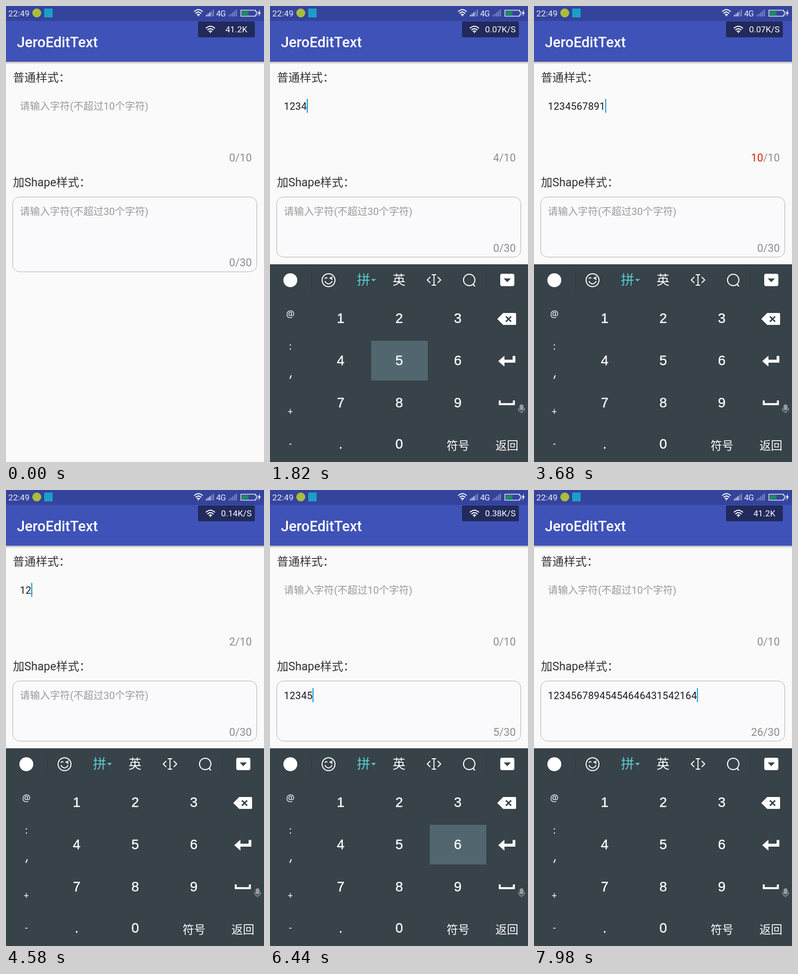
Animation of 520x918 px, one loop 8000 ms. Source, as an HTML page:

```html
<!DOCTYPE html>
<html lang="zh-CN">
<head>
<meta charset="utf-8">
<title>JeroEditText</title>
<style>
  html, body { margin: 0; width: 100%; height: 100%; overflow: hidden; background: #fafafa; }
  svg { display: block; width: 520px; height: 918px; }
  text { font-family: Roboto, 'Noto Sans CJK SC', 'Noto Sans CJK JP', sans-serif; white-space: pre; }
  .key { font-family: 'Liberation Sans', 'Noto Sans CJK SC', sans-serif; }
  .num { font-family: 'Liberation Sans', sans-serif; stroke: #fff; stroke-width: .4; }
  .sym { font-family: 'Noto Sans', 'Noto Sans CJK SC', sans-serif; }
  .label { font-size: 23.1px; fill: #333; }
  .hint { font-size: 20.2px; fill: #999; }
  .hint, .typed { letter-spacing: 0; }
  .typed { font-size: 20.2px; fill: #1c1c1c; letter-spacing: .21px; }
  .count { font-size: 21.67px; fill: #8c8c8c; letter-spacing: .1px; text-anchor: end; }
  .line { fill: none; stroke: #fff; stroke-width: 2; }
  .caret { fill: #0e93d8; }
</style>
</head>
<body>
<svg viewBox="0 0 520 918">
  <defs>
    <linearGradient id="shade" x1="0" y1="0" x2="0" y2="1">
      <stop offset="0" stop-color="#000" stop-opacity=".3"/>
      <stop offset="1" stop-color="#000" stop-opacity="0"/>
    </linearGradient>
    <g id="wifi" fill="none" stroke="#fff" stroke-width="2">
      <path d="M.8 5Q10-3.4 19.2 5M3.8 8.4Q10 2.8 16.2 8.4M6.8 11.4Q10 8.8 13.2 11.4"/>
      <circle cx="10" cy="13" r="1.3" fill="#fff" stroke="none"/>
    </g>
    <g id="mic">
      <rect x="-4" y="-9" width="8" height="12" rx="4"/>
      <path d="M-6-2V0A6 6 0 0 0 6 0V-2M0 6V9" fill="none" stroke="#949b9f" stroke-width="1.5"/>
    </g>
  </defs>

  <rect width="520" height="918" fill="#fafafa"/>
  <rect y="112" width="520" height="5" fill="url(#shade)"/>
  <rect width="520" height="112" fill="#3f52b7"/>
  <rect width="520" height="30" fill="#34439c"/>
  <text x="22" y="83" font-size="28.9" font-weight="500" fill="#fff">JeroEditText</text>

  <g id="status" fill="#e9ebf6">
    <text x="4.500" y="21" font-size="17.200">22:49</text>
    <circle cx="62" cy="14" r="9" fill="#a9bf3c"/>
    <rect x="77" y="5" width="17" height="18" rx="1.500" fill="#1b9fc4"/>
    <use href="#wifi" transform="translate(378.500 6.500) scale(.93 1)"/>
    <text x="423.500" y="20.500" font-size="16.500" letter-spacing="-.8">4G</text>
    <path d="M473.500 8.500H503V11.500H505.500V17.500H503V20.500H473.500Z" fill="none" stroke="#e9ebf6" stroke-width="1.500"/>
    <rect x="475.500" y="10.500" width="13" height="8" fill="#15925a"/>
    <path d="M512 7L507 15H510L508.500 21.500L514 13H511Z"/>
  </g>

  <g fill="#fff">
    <rect x="387" y="31" width="114.500" height="32" rx="3" fill="#212a5b"/>
    <use href="#wifi" transform="translate(402 40)"/>
    <text id="speed" x="464.300" y="53" font-size="17.200" text-anchor="middle"></text>
  </g>

  <text class="label" x="14" y="151.500">普通样式：</text>
  <text class="label" x="14" y="363">加Shape样式：</text>
  <rect id="frame" x="13.500" y="384.500" width="492" rx="14" fill="#fafafc" stroke="#b0b0b0"/>
  <g id="fields"></g>

  <g id="board">
    <rect y="520" width="520" height="398" fill="#374249"/>
    <rect id="press" fill="#51666f"/>
    <g id="tools">
      <path d="M83.500 532V572M436.500 532V572" stroke="#303a40"/>
      <circle cx="41" cy="552" r="14" fill="#fff"/>
      <g class="line">
        <circle cx="118" cy="552" r="13"/>
        <path d="M110.500 554Q118 565 125.500 554M110.500 549Q113 545.500 115.500 548M126 545.500L121 548L126 550.500"/>
        <path d="M323 545.500L317 551.500L323 557.500M338 545.500L344 551.500L338 557.500M326 541H335M326 562H335M330.500 541V562"/>
        <circle cx="401.500" cy="551.500" r="11.500"/>
        <path d="M408.500 559.500L413 564.500" stroke-width="2.500"/>
      </g>
      <path d="M204 549.500H213.500L208.700 554.500Z" fill="#5cc8cf"/>
      <rect x="464" y="539" width="28.500" height="25" rx="4" fill="#fff"/>
      <path d="M471 548.500H485.500L478.200 556Z" fill="#374249"/>
    </g>
    <g id="cands">
      <path class="line" d="M469 546.500L478 556L487 546.500" stroke-width="3"/>
      <rect y="486" width="29" height="34" fill="#6f7e86"/>
      <path d="M23.500 493L32 484.500" stroke="#808b90" stroke-width="5"/>
      <path d="M25 491.500L31 485.500" stroke="#e8ecee" stroke-width="2"/>
    </g>
    <g id="alpha">
      <rect x="204" y="871" width="113.500" height="34" rx="4" fill="#5e696f"/>
      <use href="#mic" x="305" y="889" fill="#949b9f"/>
    </g>
    <g id="idle">
      <path d="M79.500 589V752" stroke="#5d686e" stroke-width="2.500"/>
      <circle cx="41" cy="692" r="2" fill="none" stroke="#fff" stroke-width="1.300"/>
      <g class="line">
        <circle cx="477.500" cy="800" r="14.500" stroke-width="2.500"/>
        <path d="M469.500 803Q477.500 813 485.500 803"/>
      </g>
      <circle cx="472" cy="796" r="2" fill="#fff"/>
      <circle cx="483" cy="796" r="2" fill="#fff"/>
    </g>
    <g id="comp"></g>
    <g id="digits">
      <path class="line" d="M43 743.500L40 750.500" stroke-width="1.500"/>
      <path d="M463 794V801.500H491.500V794" fill="none" stroke="#fff" stroke-width="4"/>
      <use href="#mic" x="507" y="811" fill="#949b9f"/>
    </g>
    <g id="always" fill="#fff">
      <path d="M458 630L470 618H494Q496 618 496 620V640Q496 642 494 642H470Z"/>
      <path d="M475.500 625L486 635.500M486 625L475.500 635.500" stroke="#374249" stroke-width="3"/>
      <path d="M460 715L472.500 704V712H489V704.500H494.500V718H472.500V726Z"/>
    </g>
  </g>
</svg>
<script>
const LOOP = 8000, BLINK = 250, DIGIT = 11.56;
const $ = id => document.getElementById(id);

function add(parent, tag, attrs, text) {
  const el = document.createElementNS('http://www.w3.org/2000/svg', tag);
  for (const k in attrs) el.setAttribute(k, attrs[k]);
  if (text) el.textContent = text;
  return parent.appendChild(el);
}
const label = (group, x, y, size, text, cls = 'key', fill = '#fff') =>
  add($(group), 'text', { x, y, 'font-size': size, class: cls, fill, 'text-anchor': 'middle' }, text);

// Signal strength bars
[[403, 3], [449, 0]].forEach(([x, lit]) => {
  for (let i = 0; i < 5; i++) {
    const h = 3 + i * 2.7;
    add($('status'), 'rect', { x: x + i * 3.5, y: 21 - h, width: 2, height: h, opacity: i < lit ? 1 : .45 });
  }
});

// Keyboard labels
const colX = c => 142.5 + c * 118;
label('tools', 188.5, 561, 27, '拼', 'key', '#5cc8cf');
label('tools', 260, 561, 26, '英');
[['哦', 36], ['你', 105], ['m', 169], ['n', 223.5], ['o', 273], ['那', 328], ['呢', 388]].forEach(([s, x], i) =>
  label('cands', x, 562, 28.5, s, 'key', i ? '#fff' : '#86d9df'));
label('cands', 10.5, 512, 25, 'o');

['分词', 'abc', 'def', 'ghi', 'jkl', 'mno', 'pqr s', 'tuv', 'wxy z'].forEach((s, i) => {
  const x = colX(i % 3), row = Math.floor(i / 3), [a, b] = s.split(' ');
  label('alpha', x, 610 + row * 85, 16, i + 1, 'key', '#6f797e');
  if (!i) label('alpha', x, 643, 24, s).setAttribute('font-weight', 500);
  else label('alpha', x, (b ? 806 : 643 + row * 85), 30.5, a);
  if (b) label('alpha', x, 828, 30.5, b);
  label('digits', x, 638 + row * 85, 27.5, i + 1, 'num');
});
label('alpha', 260.5, 856, 16, '0', 'key', '#6f797e');
label('alpha', 142.5, 892.5, 23, '中');
label('alpha', 476.5, 892, 22, '123', 'sym');
label('digits', 142.5, 891, 27.5, '.', 'num');
label('digits', 260.5, 891, 27.5, '0', 'num');
label('digits', 477.5, 892.5, 23, '返回');
label('always', 379, 892.5, 23, '符号');

[[',', 628], ['?', 758], ['!', 823], ['～', 889]].forEach(([s, y]) => label('idle', 41, y, 22, s, 'sym'));
[['m', 628], ['n', 693], ['o', 759], ['6', 824]].forEach(([s, y]) => label('comp', 41, y, 20, s));
label('comp', 41.5, 888.5, 20, '英文');
label('comp', 477.5, 809, 23, '清空');
[['@', 627], [':', 692], ['+', 823], ['-', 888]].forEach(([s, y]) => label('digits', 41, y, 19, s, 'sym'));

// The two input fields
const fields = [{ y: 209, max: 10 }, { y: 421, max: 30 }].map(({ y, max }) => {
  const g = $('fields');
  const hint = add(g, 'text', { class: 'hint', x: 28, y });
  hint.innerHTML = `请输入字符(不超过<tspan letter-spacing=".21">${max}</tspan>个字符)`;
  const typed = add(g, 'text', { class: 'typed', x: 28, y });
  const count = add(g, 'text', { class: 'count', x: 495.5, y: y + 103.5 });
  const used = add(count, 'tspan', {});
  add(count, 'tspan', {}, '/' + max);
  const caret = add(g, 'rect', { class: 'caret', y: y - 22, width: 2, height: 28 });
  return { max, hint, typed, count, used, caret };
});

// Key taps: < deletes, # opens digits, m starts composing, F focuses the second field
const taps = [];
const run = (keys, start, step, hold = 45) =>
  [...keys].forEach((key, i) => taps.push({ key, down: start + i * step, up: start + i * step + hold }));
run('#', 1160, 0, 80);
run('123456789', 1420, 94, 48);
run('999', 2260, 90, 50);
run('<', 2740, 0, 60);
run('111111', 2940, 100, 50);
run('1', 3620, 0, 60);
run('<<<<<', 3740, 78, 48);
run('<<<<<', 4360, 78, 48);
run('F', 4940, 0, 0);
run('m', 5200, 0, 70);
run('<', 5520, 0, 60);
run('#', 5760, 0, 80);
run('12345678945', 6040, 75, 40);
run('4546', 6880, 70, 40);
run('4', 7160, 0, 60);
run('643154', 7260, 62, 36);
run('2164', 7700, 80, 40);

const speeds = [[0, '41.2K'], [140, '0.02K/S'], [1700, '0.07K/S'], [3920, '0.14K/S'], [5260, '0.38K/S'], [7400, '41.2K']];

function stateAt(t) {
  const s = { text: ['', ''], focus: 0, digits: false, comp: false, held: '', blink: 710 };
  for (const { key, down, up } of taps) {
    if (t < down) break;
    if (t < up) { s.held = key; break; }
    const old = s.text[s.focus];
    let now = old;
    if (key === '#') s.digits = true;
    else if (key === 'F') { s.focus = 1; s.digits = false; s.blink = up; }
    else if (key === 'm') { s.comp = true; s.blink = up; }
    else if (key === '<') { if (s.comp) s.comp = false; else now = old.slice(0, -1); }
    else if (old.length < fields[s.focus].max) now += key;
    if (now !== old) { s.text[s.focus] = now; s.blink = up; }
  }
  return s;
}

function keyBox(key) {
  const n = key === 'm' ? 5 : key - 1;
  const [c, r] = key === '<' ? [3, 0] : key === '#' ? [3, 3] : [n % 3, Math.floor(n / 3)];
  return { x: 86 + c * 118, y: 589 + r * 85, width: c < 3 ? 114 : 74, height: 80 };
}

const show = (el, on) => { el.style.display = on ? '' : 'none'; };

function draw(t) {
  const s = stateAt(t);
  const shrunk = t >= 420;
  $('speed').textContent = speeds.filter(v => v[0] <= t).pop()[1];
  $('frame').setAttribute('height', shrunk ? 121 : 150.5);

  fields.forEach((f, i) => {
    const text = s.text[i], n = text.length;
    show(f.hint, !n);
    f.typed.textContent = text;
    f.used.textContent = n;
    f.used.setAttribute('fill', n === f.max ? '#e01c0c' : '#8c8c8c');
    const lit = t < s.blink || (t - s.blink) % (2 * BLINK) < BLINK;
    show(f.caret, i === s.focus && t >= 440 && lit);
    f.caret.setAttribute('x', 27.8 + n * DIGIT);
  });
  fields[1].count.setAttribute('y', shrunk ? 494.5 : 524);

  const p = Math.min(1, Math.max(0, (t - 320) / 360));
  show($('board'), p > 0);
  $('board').setAttribute('transform', `translate(0 ${398 * (1 - p) ** 3})`);
  show($('press'), s.held);
  if (s.held) {
    const box = keyBox(s.held);
    for (const k in box) $('press').setAttribute(k, box[k]);
  }
  show($('tools'), !s.comp);
  show($('cands'), s.comp);
  show($('comp'), s.comp);
  show($('alpha'), !s.digits);
  show($('idle'), !s.digits && !s.comp);
  show($('digits'), s.digits);
}

const begin = performance.now();
function tick() {
  draw((performance.now() - begin) % LOOP);
  requestAnimationFrame(tick);
}
tick();
</script>
</body>
</html>
```
